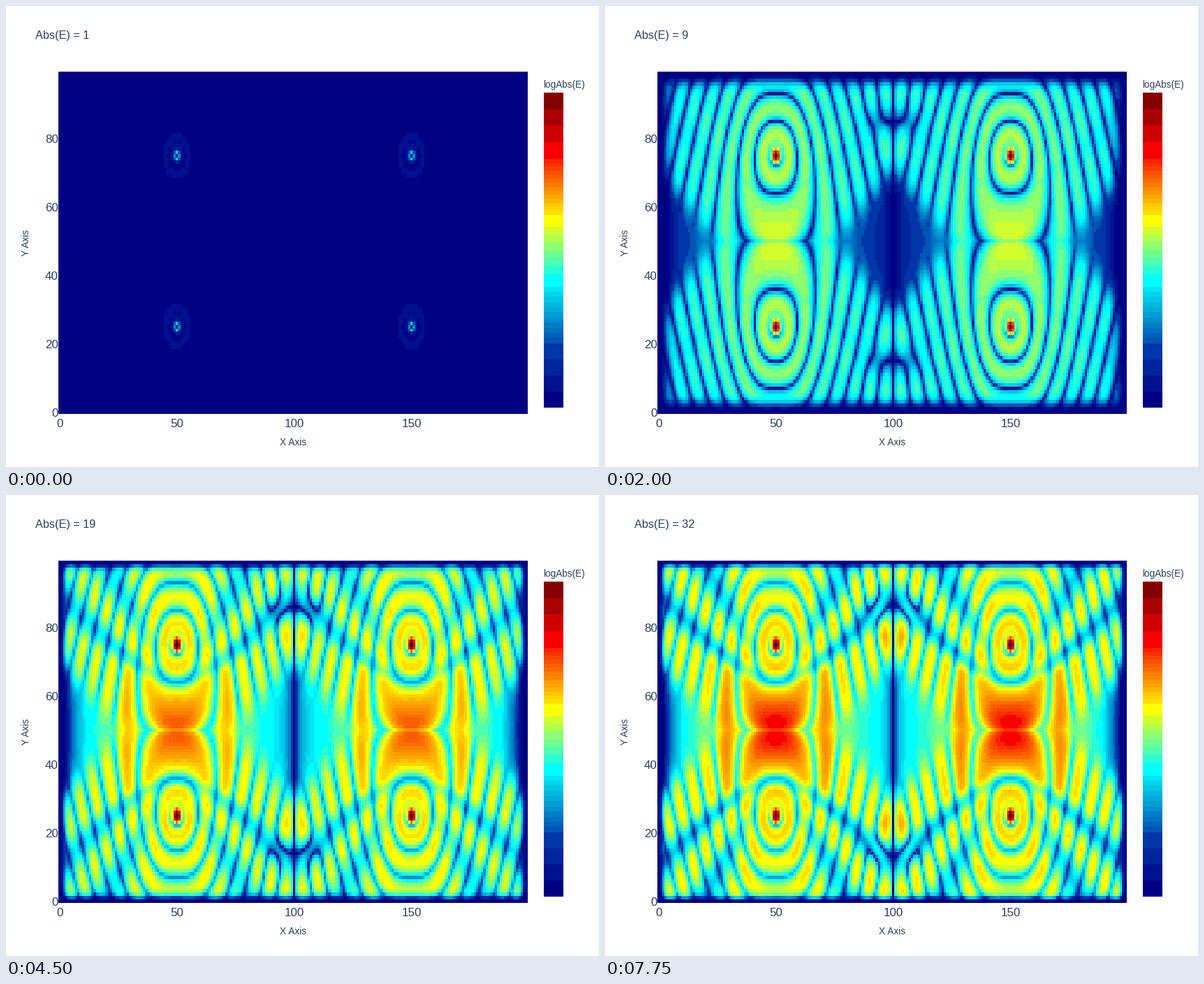
A matplotlib script for the animation above (8 s loop, 849x660 px).

```python
import numpy as np
import matplotlib.pyplot as plt
from matplotlib.animation import FuncAnimation
from matplotlib.colors import BoundaryNorm, LinearSegmentedColormap, ListedColormap

W, H, DPI = 849, 660, 100
FRAMES, INTERVAL = 32, 250
NX, NY = 200, 100
INK = "#2a3f5f"
BAR_TOP, BAR_BOTTOM = 124, 575

# Distance from a source to its first dark ring, and between later ones
FIRST_NODE, NODE_GAP = 18.25, 6.85
RING_OFFSET, TILT = 9.25, 0.37

plt.rcParams["font.family"] = "Liberation Sans"


def stepped_jet():
    """Jet colours in uneven flat steps, as (colormap, norm) over 0..1."""
    px = np.concatenate([np.linspace(575, 483, 5)[:-1], np.linspace(483, 402, 12),
                         np.linspace(384, 316, 7), np.linspace(299, 219, 15),
                         np.linspace(195, BAR_TOP, 4)])
    edges = (BAR_BOTTOM - px) / (BAR_BOTTOM - BAR_TOP)
    smooth = LinearSegmentedColormap.from_list("jet_like", [
        (0, "#000082"), (0.027, "#000082"), (0.18, "#0038a8"), (0.404, "#00ffff"),
        (0.594, "#ffff00"), (0.816, "#f60000"), (0.976, "#840000"), (1, "#840000")])
    cmap = ListedColormap(smooth((edges[1:] + edges[:-1]) / 2))
    return cmap, BoundaryNorm(edges, cmap.N)


def rise(step, scale, power):
    """Slow start, then saturation at 1."""
    return 1 - np.exp(-(step / scale) ** power)


x, y = np.meshgrid(np.arange(NX), np.arange(NY))
Y = np.abs(y - 50.0)
X_LEFT, X_RIGHT = np.abs(x - 50.0), np.abs(x - 150.0)
X_CELL = np.minimum(X_LEFT, X_RIGHT)
EDGE_X = np.minimum(x, NX - 1 - x)
EDGE_Y = np.minimum(y, NY - 1 - y)


def wedge(X):
    """Weight of the quiet zone beside a pair of sources."""
    return 1 / (1 + np.exp(-(0.85 * (X - 24) - Y) / 2.2))


def phase_of(X):
    """Rings round the source that turn into straight slanted bands."""
    ring = np.hypot(X, 0.88 * (Y - 25)) + RING_OFFSET
    band = X + TILT * Y
    mix = X ** 2 / (X ** 2 + 16 ** 2)
    path = ring + (band - ring) * mix - 8 * np.exp(-(X ** 2 + Y ** 2) / 80)
    return (np.maximum(path, 13) - FIRST_NODE) / NODE_GAP


def amplitude(X, step, late):
    near = np.hypot(X, 0.88 * (Y - 25))
    amp = 45 * rise(step, 9.5, 1.7) * np.exp(-near / (6 * step))
    amp *= 1 + 0.07 * step * np.exp(-(X / 13) ** 2 - (Y / 9) ** 2)
    amp *= 1 + 0.5 * late * np.exp(-((X - 20) / 6) ** 2 - (Y / 18) ** 4)

    # lobes along each band
    along = np.maximum(np.hypot(X, Y + 25) - np.hypot(X, Y - 25), 24)
    lobes = 1 - np.cos(2 * np.pi * (along - 24) / 11.5)
    amp *= 1 - 0.4 * late * lobes * (1 - np.exp(-(near / 14) ** 2))
    return amp * np.exp(-np.maximum(X - 50, 0) / 12) * (1 - wedge(X))


def source_gain():
    """Hot core, dark centre and a dim crescent below each source."""
    gain = np.ones((NY, NX))
    for sx in (50, 150):
        for sy in (25, 75):
            dx, dy = x - sx, y - sy
            r = np.hypot(dx, dy)
            gain *= 1 + 20 * np.exp(-(1.8 * dx ** 2 + dy ** 2) / 1.7)
            dim = np.clip(0.4 - 0.15 * dy, 0, 0.8)
            gain *= 1 - dim * np.exp(-((r - 3) / 0.7) ** 2)
            gain[r == 0] = 0
    return gain


GAIN = source_gain()
WAVE_LEFT, WAVE_RIGHT = (np.sin(np.pi * phase_of(X)) for X in (X_LEFT, X_RIGHT))
QUIET = (wedge(X_CELL) * np.exp(-(X_CELL - 33) / 25)
         * (1 - np.exp(-(EDGE_X / 8) ** 2)))


def level(step):
    late = rise(step, 15, 3)
    left, right = (amplitude(X, step, late) for X in (X_LEFT, X_RIGHT))
    wave = left * WAVE_LEFT - right * WAVE_RIGHT
    haze = 0.18 * late * (left - right)
    quiet = 15 * late * np.tanh(np.abs(x - 100) / (8 - 5 * late)) * QUIET
    margin = 4.5 - 2.7 * late
    edge = rise(EDGE_X, margin + 1, 2.5) * rise(EDGE_Y, margin, 2.5)
    total = (np.hypot(wave, haze) * GAIN + quiet) * edge
    return np.clip(np.log1p(total) / 6, 0, 0.999)


fig = plt.figure(figsize=(W / DPI, H / DPI), dpi=DPI, facecolor="white")
ax = fig.add_axes([0, 0, 1, 1])
ax.axis("off")
cmap, norm = stepped_jet()


def image(data, box):
    return ax.imshow(data, extent=box, origin="lower", aspect="auto",
                     cmap=cmap, norm=norm, interpolation="nearest")


def label(px, py, text, size, **kw):
    return ax.text(px, py, text, fontsize=size * 72 / DPI, color=INK, **kw)


heat = image(level(1), (75.5, 747, 584.4, 94.5))
bar = np.linspace(0, 0.999, BAR_BOTTOM - BAR_TOP)[:, None]
image(bar, (770, 798, BAR_BOTTOM, BAR_TOP))
ax.set_xlim(0, W)
ax.set_ylim(H, 0)

title = label(42, 47, "Abs(E) = 1", 16.2)
label(769.5, 117, "logAbs(E)", 13.5)
label(411.5, 629, "X Axis", 13.7, ha="center")
label(29, 339, "Y Axis", 13.7, ha="center", va="center", rotation=90)
for v in range(0, NX, 50):
    label(77.2 + 3.357 * v, 603, str(v), 17, ha="center")
for v in range(0, NY, 20):
    label(75, 588 - 4.895 * v, str(v), 17, ha="right")


def update(i):
    heat.set_data(level(i + 1))
    title.set_text(f"Abs(E) = {i + 1}")
    return heat, title


anim = FuncAnimation(fig, update, frames=FRAMES, interval=INTERVAL,
                     repeat=True, repeat_delay=0, blit=False)
plt.show()
```
